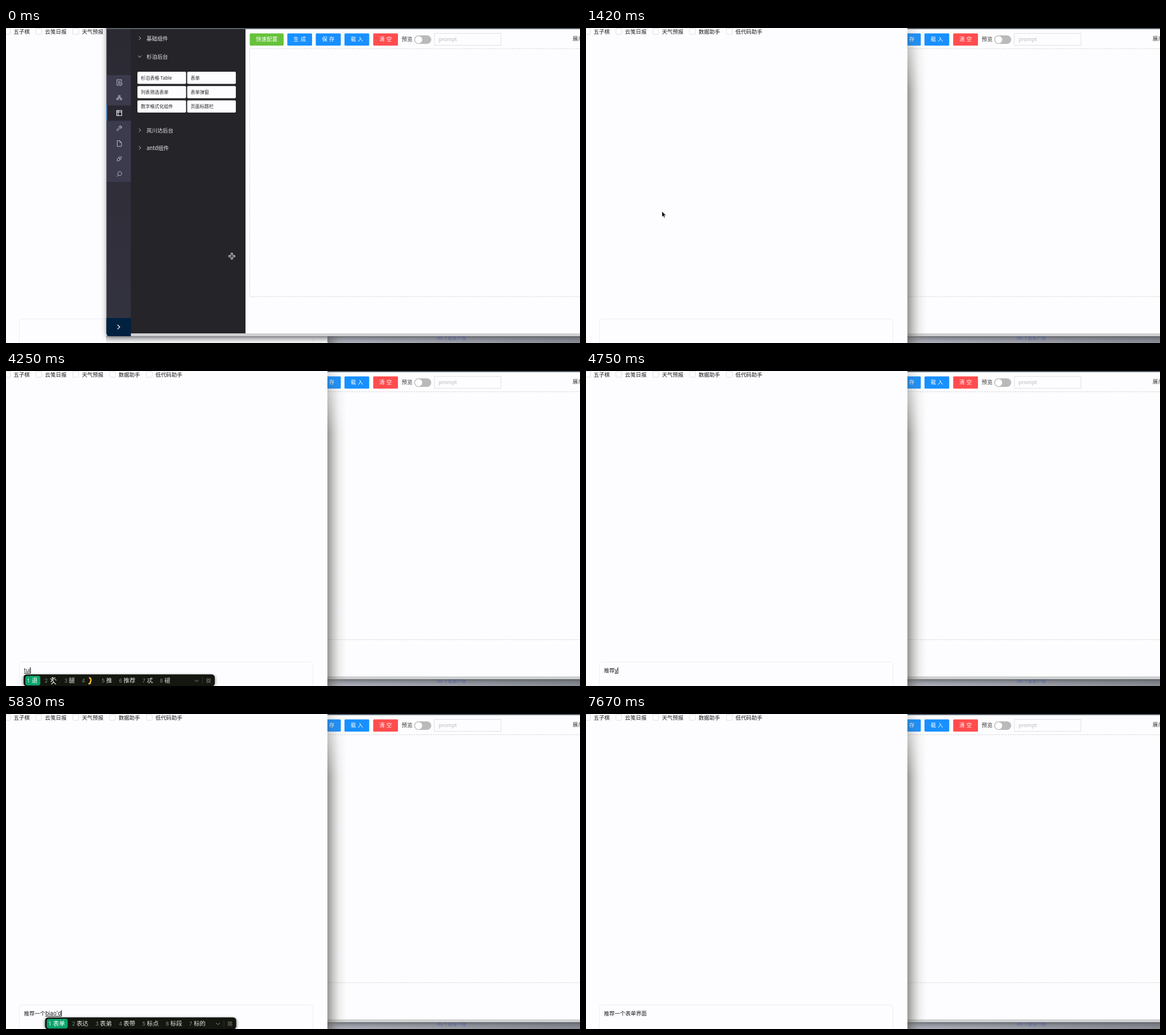
Write an HTML page that moves like this. It is 1009 px wide and 555 px high and loops after 8000 ms.

```html
<!DOCTYPE html>
<html lang="zh">
<head>
<meta charset="utf-8">
<style>
html, body { margin: 0; width: 100%; height: 100%; overflow: hidden; background: #fdfdff; }
svg { display: block; width: 100%; height: 100%; }
text { font-family: "Noto Sans CJK SC", "Noto Sans CJK", "Noto Sans", sans-serif; white-space: pre; }
.latin { font-family: Inter, "Noto Sans CJK SC", sans-serif; }
</style>
</head>
<body>
<svg id="stage" viewBox="0 0 1009 555" preserveAspectRatio="none">
  <defs>
    <linearGradient id="desk">
      <stop offset="0" stop-color="#9396a4"/><stop offset=".3" stop-color="#b4b6c4"/>
      <stop offset=".45" stop-color="#bfc1dc"/><stop offset=".6" stop-color="#b2b5c2"/>
      <stop offset="1" stop-color="#8b8f98"/>
    </linearGradient>
    <linearGradient id="under" x2="0" y2="1">
      <stop offset="0" stop-color="#43464d" stop-opacity=".62"/>
      <stop offset=".3" stop-color="#5a5d66" stop-opacity=".3"/>
      <stop offset="1" stop-color="#777" stop-opacity=".04"/>
    </linearGradient>
    <linearGradient id="side">
      <stop offset="0" stop-color="#55554f" stop-opacity=".62"/>
      <stop offset=".25" stop-color="#6a6a62" stop-opacity=".42"/>
      <stop offset=".6" stop-color="#88887c" stop-opacity=".14"/>
      <stop offset="1" stop-color="#999" stop-opacity="0"/>
    </linearGradient>
    <linearGradient id="fadeDown" x2="0" y2="1">
      <stop offset="0" stop-color="#fff" stop-opacity=".25"/>
      <stop offset=".07" stop-color="#fff" stop-opacity=".55"/>
      <stop offset=".2" stop-color="#fff"/>
    </linearGradient>
    <linearGradient id="rail" x2="0" y2="1">
      <stop offset="0" stop-color="#2b2a33"/><stop offset="1" stop-color="#33323f"/>
    </linearGradient>
    <mask id="sideMask"><rect x="565" width="40" height="555" fill="url(#fadeDown)"/></mask>
    <filter id="blur" x="-10%" y="-10%" width="120%" height="120%"><feGaussianBlur stdDeviation="5"/></filter>
    <filter id="soft" x="-10%" y="-60%" width="120%" height="220%"><feGaussianBlur stdDeviation="2.6"/></filter>
    <clipPath id="editorClip"><path d="M176.5 0H1009V543H182.500Q176.500 543 176.500 537Z"/></clipPath>
  </defs>
  <g id="desktop"></g>
  <g id="windows"><g id="chat"></g><g id="editor"></g></g>
  <g id="ime"></g>
  <g id="cursor"></g>
</svg>
<script>
const $ = id => document.getElementById(id);
const rect = (x, y, w, h, fill, more = '') =>
  `<rect x="${x}" y="${y}" width="${w}" height="${h}" fill="${fill}" ${more}/>`;
const text = (x, y, s, size = 9.45, fill = '#222', more = '') =>
  `<text x="${x}" y="${y}" font-size="${size}" fill="${fill}" ${more}>${s}</text>`;
const line = (d, stroke, width = 1, more = '') =>
  `<path d="${d}" fill="none" stroke="${stroke}" stroke-width="${width}" ${more}/>`;

const LINE = 31.5, CHAR = 9.42;

function drawDesktop() {
  $('desktop').innerHTML = rect(0, 0, 1009, 555, 'url(#desk)') +
    line('M758 544V548H767V544M762.5 540V546M760 544L762.5 546.500L765 544', '#5570d8') +
    text(768.5, 549, '下载客户端', 8, '#5570d8');
}

function drawChat() {
  const tabs = ['五子棋', '云笺日报', '天气预报', '数据助手', '低代码助手'];
  const boxes = [-2.5, 52.7, 117.5, 182, 246.800];
  $('chat').innerHTML =
    rect(565, 0, 34, 555, 'url(#side)', 'mask="url(#sideMask)"') +
    rect(0, 0, 565, 555, '#fdfdff') +
    tabs.map((s, i) =>
      rect(boxes[i], .5, 10.2, 10.6, '#fff', 'rx="1.5" stroke="#dcdce4"') +
      text(boxes[i] + 15.900, 9.6, s, 9.45, '#1c1c1e')).join('') +
    rect(23.5, 512.5, 516, 60, '#fdfdff', 'rx="5" stroke="#efeff5"');
}

const ICONS = [
  'M-1 5H-4V-5H4V-1M-2 -2H2M-2 0H0M2 0L5 1V3Q4 5 2 6Q0 5 -.5 3V1ZM1 3L2 4L3.500 2',
  'M-1.500 -4H1.500V-1.500H-1.500ZM0 -1.500V0M-3 1V0H3V1M-4.500 1H-1.500V3.500H-4.500ZM1.500 1H4.500V3.500H1.500Z',
  'M-4.500 -4.500H4.500V4.500H-4.500ZM-4.500 -1.800H4.500M-1.800 -4.500V4.500',
  'M-4.500 3L0 -1.500Q-.5 -4.500 3 -4.500L1.500 -2.500L2.500 -1.500L4.500 -3Q5 .5 1.500 0L-3 4.500Z',
  'M-3.500 -5H1L4 -2V5H-3.500ZM1 -5V-2H4',
  'M-4.500 4.500L-3 3M3 -3L4.500 -4.500M-3 3Q-5 0 -1.500 -1.500L1.500 1.500Q0 5 -3 3M3 -3Q5 0 2.500 1L-1 -2.500Q0 -5 3 -3',
  'M-4.500 4.500L-1.500 1.500M1 -4.500A3.500 3.500 0 1 1 .99 -4.500Z'
];

function drawEditor() {
  const icons = ICONS.map((d, i) =>
    line(d, i === 2 ? '#fff' : '#b9b9c4', 1, `transform="translate(199 ${96 + i * 26.9})"`)).join('');
  const heads = [['基础组件', 18], ['杉泊后台', 50], ['岚川达后台', 180], ['antd组件', 211]]
    .map(([s, y], i) =>
      line(i === 1 ? `M232 ${y - 1.5}L235 ${y + 2}L238 ${y - 1.5}` : `M233.500 ${y - 3}L237 ${y}L233.500 ${y + 3}`, '#b5b5ba') +
      text(247, y + 3.6, s, 9.45, '#e8e8ea')).join('');
  const cards = ['杉泊表格 Table', '表单', '列表筛选表单', '表单弹窗', '数字格式化组件', '页面标题栏']
    .map((s, i) => {
      const x = 231 + i % 2 * 87.5, y = 77 + (i >> 1) * 25.2;
      return rect(x, y, 85.500, 21.5, '#fdfdff', 'rx="2"') + text(x + 6, y + 13.6, s, 8.1, '#26262a');
    }).join('');
  const buttons = [['快速配置', 428.5, 59.5, '#67c23a'], ['生成', 494.5, 43.5, '#1890ff'],
    ['保存', 544.5, 44, '#1890ff'], ['载入', 595, 43.5, '#1890ff'], ['清空', 645.5, 43.5, '#ff4d4f']]
    .map(([s, x, w, c]) => {
      const gap = s.length === 2 ? 3.2 : 0;
      return rect(x, 9.5, w, 21.5, c, 'rx="1.5"') +
        text(x + w / 2 + gap / 2, 23.2, s, 9.45, '#fff', `text-anchor="middle" font-weight="500" letter-spacing="${gap}"`);
    }).join('');

  $('editor').innerHTML =
    rect(176, -40, 900, 586, '#50504a', 'id="glow" rx="8" opacity=".5" filter="url(#blur)"') +
    rect(176, 542, 833, 13, 'url(#under)') +
    '<g clip-path="url(#editorClip)">' +
    rect(176, 0, 833, 543, '#fdfdff') +
    rect(176, 0, 44, 543, 'url(#rail)') +
    rect(177, 83, 43, 188, '#3c3b4e') +
    rect(177, 136.5, 43, 27, '#292832') +
    rect(176.5, 136.5, 1.3, 27, '#1890ff') +
    rect(176, 511, 44, 32, '#002140') +
    line('M196 523L200 526.800L196 530.600', '#fff', 1.2) + icons +
    rect(219.5, 0, 201.5, 538, '#252429') + heads + cards +
    rect(219.5, 538, 790, 5, '#cfd0d1') +
    rect(176, 0, 833, 2, '#56616a') +
    line('M1009 36.500H428.500V473.300H1009', '#d3d3d6', 1, 'stroke-dasharray="2.5 1.7"') +
    buttons +
    text(695.5, 23, '预览', 9.45, '#333') +
    rect(717.5, 13, 30, 15, '#bababa', 'rx="7.5"') +
    '<circle cx="725.3" cy="20.500" r="6.3" fill="#fff"/>' +
    rect(753, 9.5, 117, 21, '#fdfdff', 'stroke="#e0e0e4"') +
    text(760.5, 23, 'prompt', 9.2, '#bcbcc0') +
    text(996, 22.300, '展示', 9.45, '#333') + '</g>';
}

// Input state: start step (1/12 s), committed text, pinyin, candidates
const TYPING = [
  [29, '', ''],
  [49, '', 't', '他 图 同 天 听 她 太 头'],
  [50, '', 'tu', '图 土 突 吐 涂 途 兔 徒'],
  [51, '', 'tui', '退 @ 腿 # 推 推荐 忒 褪'],
  [53, '', "tui'j", '推荐 推进 退居 推举 退'],
  [54, '推荐', ''],
  [57, '推荐', 'y', ''],
  [58, '推荐', 'y', '一 有 要 也 用 与 于 以'],
  [60, '推荐', 'yi', '一 以 已 亿 意 易 一个 依'],
  [61, '推荐', "yi'g", '一个 一共 一股 一贯 一'],
  [63, '推荐一个', ''],
  [65, '推荐一个', 'b', '不 吧 把 被 比 本 并 部'],
  [67, '推荐一个', 'bi', '比 必 笔 币 闭 避 毕 彼'],
  [68, '推荐一个', 'bia', '表 变 边 便 编 遍 标 别'],
  [69, '推荐一个', 'biao', '表 标 彪 飙 表示 镖 裱'],
  [70, '推荐一个', "biao'd", '表单 表达 表弟 表带 标点 标段 标的'],
  [76, '推荐一个表单', ''],
  [79, '推荐一个表单', 'j', '就 见 家 将 叫 及 几 件'],
  [80, '推荐一个表单', 'jie', '界 接 节 姐 解 结 借 街'],
  [82, '推荐一个表单', "jie'm", '界面 节目 姐妹 揭秘 解码'],
  [87, '推荐一个表单界面', '']
];

function candidate(s, x) {
  const pen = `transform="translate(${x + 9} 539)"`;
  if (s === '@')
    return line('M1 3L5 5L10 1M5 5L7 9L3 13M7 9L11 13M5 5L2 9M9 4L12 6', '#d8d8cf', 1.3, pen) +
      `<circle cx="${x + 14.300}" cy="540.8" r="1.6" fill="#d8d8cf"/>`;
  if (s === '#')
    return line('M4 1Q8 3 7 7Q6 9 6 11L3 12.500', '#f4b82e', 2.6, pen);
  return '';
}

function bar(x, list, w) {
  let at = x + 6;
  const items = list.split(' ').map((s, i) => {
    const emoji = s === '@' || s === '#', n = emoji ? 1.4 : s.length, on = i === 0;
    const out = (on ? rect(x + 3, 537, 15.700 + 10.6 * n, 17, '#0aa36c', 'rx="4"') : '') +
      text(at + .3, 549, i + 1, 8.6, on ? '#fff' : '#8d8f88', 'class="latin"') +
      (emoji ? candidate(s, at) : text(at + 8, 549.2, s, 10.5, on ? '#fff' : '#e2e3de', 'font-weight="500"'));
    at += 20 + 10.6 * n;
    return out;
  }).join('');
  const c = x + w - 32, g = x + w - 11;
  const dots = [[-2, -2], [2, -2], [-2, 2], [2, 2]]
    .map(([a, b]) => `<circle cx="${g + a}" cy="${545.500 + b}" r="1.5" fill="none" stroke="#83857e" stroke-width=".9"/>`).join('');
  return rect(x - 1, 536, w + 2, 20, '#000', 'rx="6" opacity=".45" filter="url(#soft)"') +
    rect(x, 534.5, w, 21, '#14170f', 'rx="5.500"') + items +
    line(`M${c - 3.5} 544L${c} 547.500L${c + 3.5} 544`, '#8d8f88') +
    line(`M${c + 10.500} 540V551`, '#30332b') + dots;
}

function drawInput(step) {
  const state = TYPING.filter(s => s[0] <= step).pop();
  if (!state) { $('ime').innerHTML = ''; return; }
  const [, done, pinyin, list] = state;
  const x = LINE + done.length * CHAR;
  $('ime').innerHTML = text(LINE, 530.800, done, CHAR, '#1c1c1e') +
    text(x, 530.800, pinyin, 9.7, '#1c1c1e', 'id="pinyin" class="latin"');
  const w = pinyin ? $('pinyin').getComputedTextLength() : 0;
  const hidden = step >= 35 && step < 41 || step >= 47 && step < 49 || step >= 92;
  let extra = '';
  if (pinyin) extra += rect(x, 532, w, 1, '#1c1c1e');
  if (!hidden) extra += rect(x + w - (w || done ? .2 : .5), 522, 1, 11, '#1c1c1e');
  if (list) extra += bar(x - .5, list, done.length === 2 ? 342 : done.length === 6 ? 339 : 336);
  $('ime').insertAdjacentHTML('beforeend', extra);
}

const clamp = v => Math.max(0, Math.min(1, v));
const ease = v => v * v * (3 - 2 * v);
const mix = (a, b, p) => a + (b - a) * p;

function pointer(step) {
  if (step < 6) {
    const p = clamp((step - 3) / 2);
    return [mix(397, 416, p), mix(402, 361, p)];
  }
  if (step < 20) {
    const p = ease(clamp((step - 6) / 7));
    return [mix(416, 133.500, p), mix(361, 323, p)];
  }
  const p = ease(clamp((step - 19) / 9));
  return [mix(133.500, 118.600, p), mix(323, 533.500, p)];
}

function drawCursor(step) {
  if (step >= 49) { $('cursor').innerHTML = ''; return; }
  const [x, y] = pointer(step);
  let art;
  if (step < 17 && x > 220)
    art = '<path d="M-1.300 -5.300H1.300V-1.300H5.300V1.300H1.300V5.300H-1.300V1.300H-5.300V-1.300H-1.300Z" fill="#36363a" stroke="#e6e6e6" stroke-width="1"/>';
  else if (y > 513)
    art = line('M-2.500 -5Q0 -5 0 -3.500Q0 -5 2.500 -5M0 -4V4M-2.500 5Q0 5 0 3.500Q0 5 2.500 5', '#111', 1.1);
  else
    art = '<path d="M0 0V10L2.300 7.900L3.900 11.500L5.500 10.800L4 7.300H7.200Z" fill="#000" stroke="#fff" stroke-width=".7"/>';
  $('cursor').innerHTML = `<g transform="translate(${x} ${y})">${art}</g>`;
}

let shown = -1;
function render(ms) {
  const step = Math.floor(ms * 12 / 1000 + .06);
  if (step === shown) return;
  shown = step;
  const front = $(step >= 17 ? 'chat' : 'editor');
  if ($('windows').lastElementChild !== front) $('windows').append(front);
  drawInput(step);
  drawCursor(step);
}

drawDesktop();
drawChat();
drawEditor();
const start = performance.now();
function tick() {
  render((performance.now() - start) % 8000);
  requestAnimationFrame(tick);
}
tick();
</script>
</body>
</html>
```
